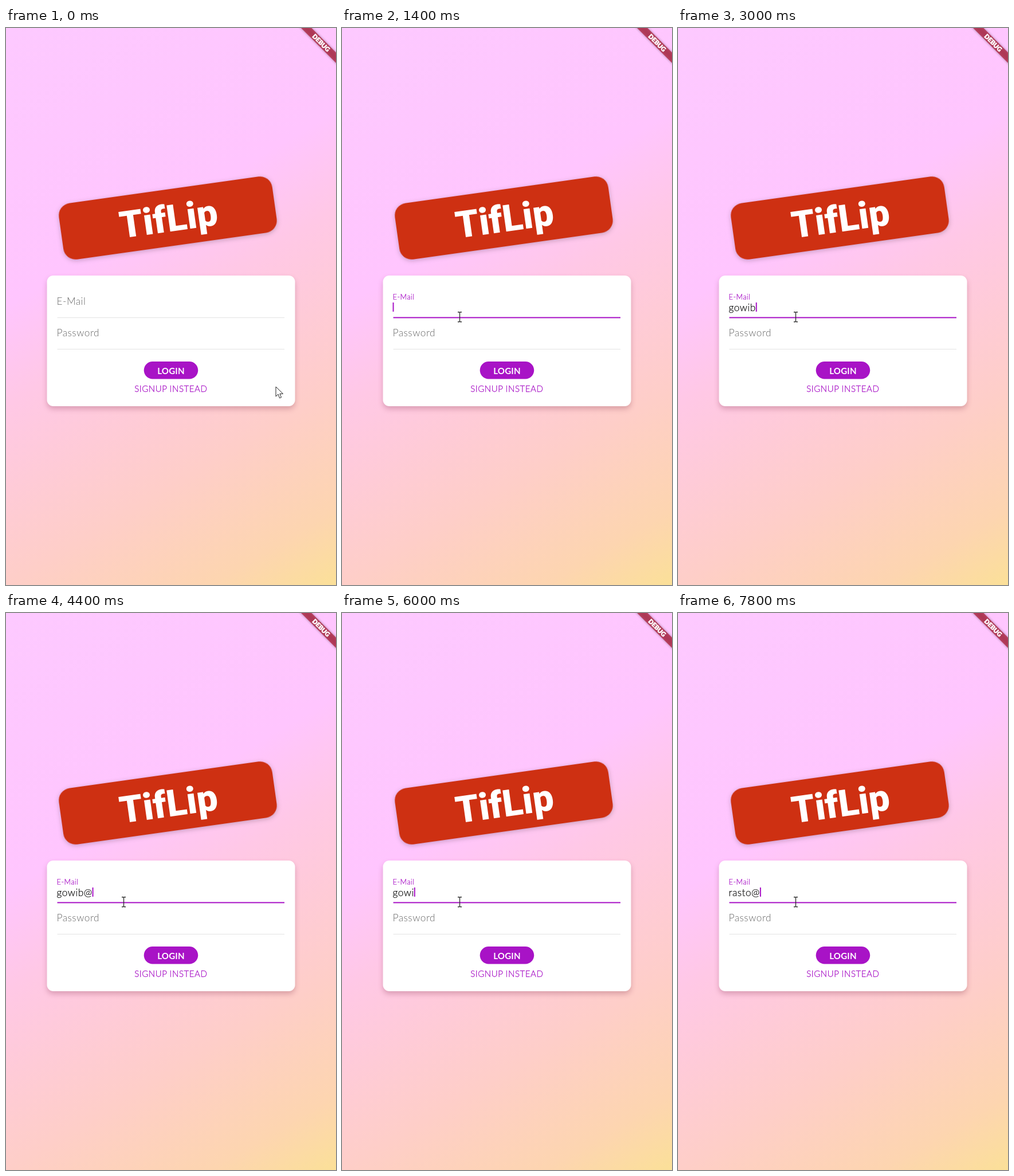
Animation, 576 px wide and 972 px high, one loop 8000 ms. Source, as an HTML page:

```html
<!DOCTYPE html>
<html lang="en">
<head>
<meta charset="utf-8">
<title>Login form</title>
<style>
  html, body { margin: 0; width: 100%; height: 100%; overflow: hidden; }
  svg { display: block; width: 100vw; height: 100vh; }
  text { font-family: Lato, sans-serif; font-weight: 300; letter-spacing: .5px; white-space: pre; }
  .field { font-size: 17.25px; }
  .button { font-size: 15.1px; text-anchor: middle; }
  .login { font-weight: 700; letter-spacing: .15px; }
  .title { font: 900 65px Roboto, sans-serif; letter-spacing: 0; text-anchor: middle; }
  .ribbon { font-size: 11px; font-weight: 900; letter-spacing: 0; text-anchor: middle; stroke: #fff; stroke-width: .5px; }
  .inked { stroke: #a813c6; stroke-width: .3px; }
  .typed { stroke: #111; stroke-width: .25px; }
  .panel { filter: drop-shadow(0 2px 4px rgba(0, 0, 0, .22)); }
  .card { filter: drop-shadow(0 5px 5px rgba(90, 0, 30, .22)); }
</style>
</head>
<body>
<svg viewBox="0 0 576 972" preserveAspectRatio="none">
  <defs>
    <linearGradient id="sky" gradientUnits="userSpaceOnUse" x1="0" y1="0" x2="576" y2="972">
      <stop offset="0" stop-color="#fdc9ff"/>
      <stop offset=".37" stop-color="#ffc5fe"/>
      <stop offset=".5" stop-color="#ffc8e6"/>
      <stop offset=".74" stop-color="#fecec8"/>
      <stop offset=".9" stop-color="#fdd5b0"/>
      <stop offset="1" stop-color="#fbe098"/>
    </linearGradient>
    <filter id="soft" x="-20%" y="-80%" width="140%" height="260%">
      <feGaussianBlur stdDeviation="2"/>
    </filter>
  </defs>

  <rect width="576" height="972" fill="url(#sky)"/>

  <g transform="translate(282.5 332) rotate(-8)">
    <rect class="panel" x="-188" y="-50" width="376" height="99" rx="21.5" fill="#ce3012"/>
    <text class="title" x="1" y="23.5" fill="#fff">TifLip</text>
  </g>

  <rect class="card" x="71.5" y="432" width="433" height="228" rx="11" fill="#fff"/>

  <g id="label"><text class="field" id="labelText">E-Mail</text></g>
  <text class="field typed" id="input" x="88.5" y="494" fill="#111"></text>
  <rect id="caret" y="479" width="2" height="16" fill="#a813c6"/>
  <rect id="emailLine" x="89.5" width="396.5"/>
  <text class="field" x="88.5" y="538" fill="#666">Password</text>
  <rect id="passwordLine" x="89.5" y="560" width="396.5" height="1"/>

  <rect x="240.7" y="582" width="94.5" height="30.5" rx="15.25" fill="#a813c6"/>
  <text class="button login" x="288" y="604" fill="#fff">LOGIN</text>
  <text class="button inked" x="287.8" y="634.5" fill="#a813c6">SIGNUP INSTEAD</text>

  <g transform="translate(576 0) rotate(45)">
    <rect x="-50" y="30.2" width="100" height="12.9" fill="#000" opacity=".35" filter="url(#soft)"/>
    <rect x="-50" y="30.2" width="100" height="12.9" fill="#b0203c" fill-opacity=".75"/>
    <text class="ribbon" y="40.6" fill="#fff">DEBUG</text>
  </g>

  <g id="pointer">
    <path id="arrow" d="M0 0V17l4-4 2.6 6.8 3-1.3-2.7-6.2h5.6z" fill="#fff" stroke="#222" stroke-width="1"/>
    <path id="beam" d="M-3.5-8.5H-1L0-7.5 1-8.5H3.5M0-7.5V7.5M-3.5 8.5H-1L0 7.5 1 8.5H3.5"
          fill="none" stroke="#333" stroke-width="1.4"/>
  </g>
</svg>
<script>
  const LOOP = 8000, STEP = 200, FOCUS = 1200;
  const PURPLE = "#a813c6";
  const FIRST = "gowib@", SECOND = "rasto@";

  // Each edit: time, word, number of letters showing
  const edits = [
    [FOCUS, FIRST, 0],
    [2000, FIRST, 1], [2200, FIRST, 2], [2400, FIRST, 3], [2600, FIRST, 4], [2800, FIRST, 5],
    [4000, FIRST, 6],
    [5800, FIRST, 5], [6000, FIRST, 4], [6200, FIRST, 3], [6400, FIRST, 2], [6600, FIRST, 0],
    [6800, SECOND, 1], [7000, SECOND, 2], [7200, SECOND, 3], [7400, SECOND, 4],
    [7600, SECOND, 5], [7800, SECOND, 6]
  ];

  const el = id => document.getElementById(id);
  const set = (id, attrs) => {
    for (const key in attrs) el(id).setAttribute(key, attrs[key]);
  };
  const progress = (t, from, to) => Math.min(1, Math.max(0, (t - from) / (to - from)));
  const ease = p => p * p * (3 - 2 * p);
  const mix = (a, b, p) => a + (b - a) * p;
  const show = on => ({ visibility: on ? "visible" : "hidden" });

  function drawPointer(t) {
    const p = ease(progress(t, 200, 750));
    const x = mix(471, 205.5, p);
    const y = mix(626, 506.3, p) - 2 * progress(t, 800, 1200);
    const overField = y < 562;
    set("pointer", { transform: `translate(${x} ${y})` });
    set("arrow", show(!overField));
    set("beam", show(overField));
  }

  function drawFields(t) {
    const focused = t >= FOCUS;
    const lift = ease(progress(t, FOCUS - 100, FOCUS + 100));
    set("label", { transform: `translate(88.5 ${mix(483, 474, lift)}) scale(${mix(1, .75, lift)})` });
    set("labelText", { fill: focused ? PURPLE : "#666", class: focused ? "field inked" : "field" });
    set("emailLine", {
      y: focused ? 504.4 : 505, height: focused ? 2 : 1, fill: focused ? PURPLE : "#e3e3e3"
    });
    set("passwordLine", { fill: t >= 600 && t < 1000 ? "#d0d0d0" : "#e3e3e3" });

    const edit = edits.filter(e => e[0] <= t).pop();
    const [since, word, count] = edit || [0, "", 0];
    el("input").textContent = word.slice(0, count);
    const end = count ? el("input").getComputedTextLength() : 0;
    set("caret", { x: 88.5 + end, ...show(focused && (t - since) % 1000 < 500) });
  }

  const start = performance.now();
  function frame() {
    const elapsed = (performance.now() - start) % LOOP;
    const t = Math.floor(elapsed / STEP) * STEP;
    drawPointer(t);
    drawFields(t);
    requestAnimationFrame(frame);
  }
  frame();
</script>
</body>
</html>
```
